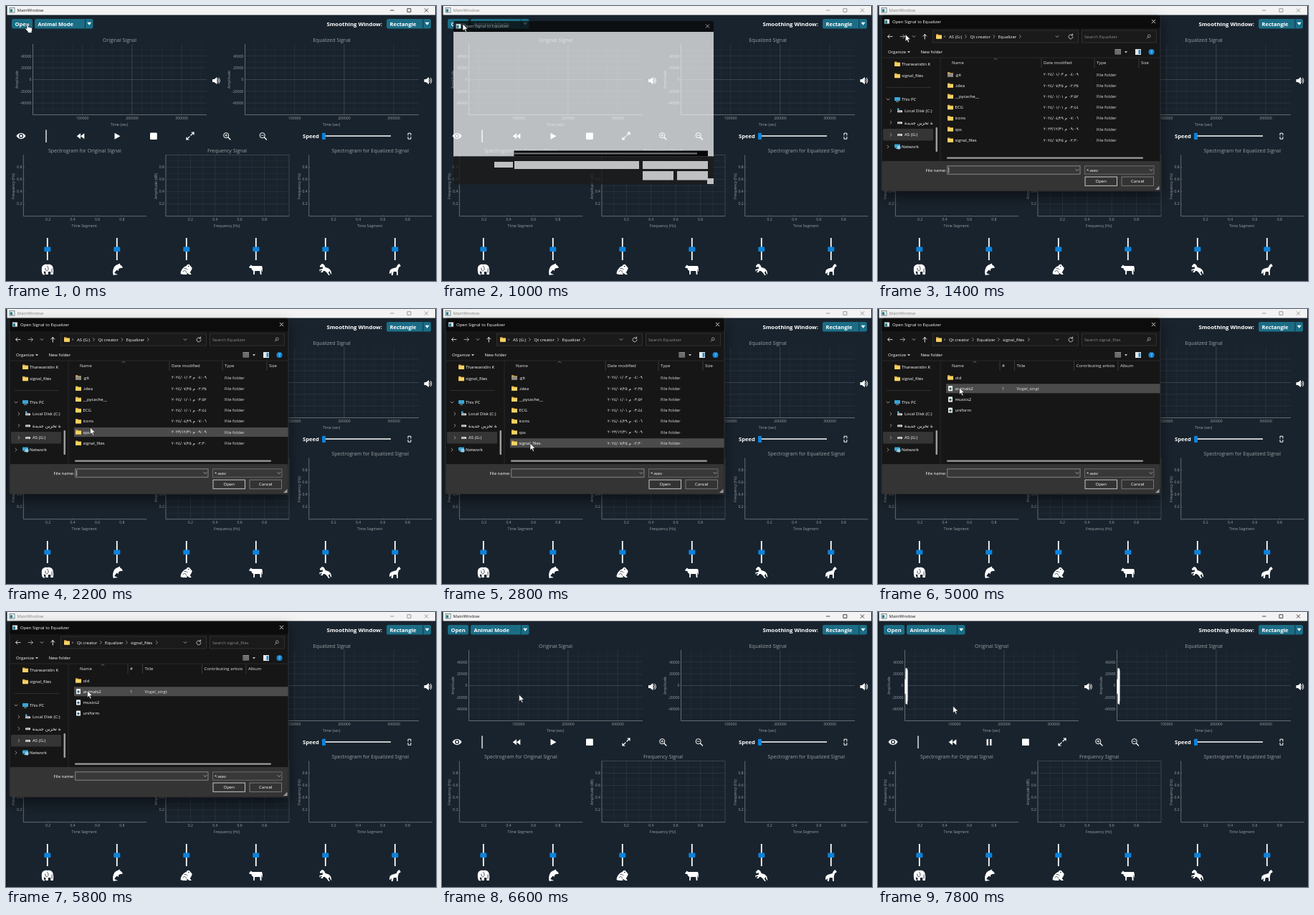
An HTML page for the animation above (8000 ms loop, 600 px wide and 383 px high).

```html
<!DOCTYPE html>
<html lang="en">
<head>
<meta charset="utf-8">
<title>Signal equalizer</title>
<style>
html, body { margin: 0; width: 100%; height: 100%; overflow: hidden; background: #19232d; }
svg { display: block; width: 600px; height: 383px; }
text { font-family: "Open Sans", "Noto Sans", sans-serif; white-space: pre; }
.ar { font-family: "DejaVu Sans", sans-serif; }
</style>
</head>
<body>
<svg id="stage" viewBox="0 0 600 383" xmlns="http://www.w3.org/2000/svg"></svg>
<script>
const LOOP = 8000, STEP = 200;
const BG = '#19232d', BLUE = '#0c83dc', TEAL = '#1b6d86', GREY = '#9a9fa4';

// Text is placed by its vertical middle.
const text = (x, y, s, size = 6, fill = '#fff', more = '') =>
  `<text x="${x}" y="${y + size * 0.36}" font-size="${size}" fill="${fill}" ${more}>${s}</text>`;
const mid = (x, y, s, size, fill = GREY) => text(x, y, s, size, fill, 'text-anchor="middle"');
const bold = (x, y, s, size = 7.6) => text(x, y, s, size, '#fff', 'font-weight="700"');
const rect = (x, y, x2, y2, fill, more = '') =>
  `<rect x="${x}" y="${y}" width="${x2 - x}" height="${y2 - y}" fill="${fill}" ${more}/>`;
const line = (x, y, x2, y2, color, w = 1, more = '') =>
  `<line x1="${x}" y1="${y}" x2="${x2}" y2="${y2}" stroke="${color}" stroke-width="${w}" ${more}/>`;
const fill = (d, color = '#fff') => `<path d="${d}" fill="${color}"/>`;
const stroke = (d, color = '#fff', w = 1) =>
  `<path d="${d}" fill="none" stroke="${color}" stroke-width="${w}" stroke-linecap="round" stroke-linejoin="round"/>`;
const at = (x, y, body) => `<g transform="translate(${x} ${y})">${body}</g>`;
const group = (id, body) => `<g id="${id}">${body}</g>`;
const seq = (from, to, step) =>
  Array.from({ length: Math.floor((to - from) / step + 1.001) }, (_, i) => from + i * step);

const chevRight = (x, y, c = '#bbb') => stroke(`M${x - 1} ${y - 2}l2 2l-2 2`, c, 0.7);
const chevDown = (x, y, c = '#ccc') => stroke(`M${x - 2} ${y - 1}l2 2l2 -2`, c, 0.7);
const cross = (x, y, c) => stroke(`M${x - 2.3} ${y - 2.3}l4.6 4.6m0 -4.6l-4.6 4.6`, c, 0.8);
const appIcon = (x, y) =>
  rect(x, y, x + 7, y + 6.5, '#e9eef0', 'stroke="#46545c" stroke-width=".6"') +
  rect(x + 0.8, y + 1.8, x + 4, y + 5.7, '#21808c');

// ---------- main window ----------
function titleBar() {
  const buttons = stroke('M536.5 6h4.5', 'currentColor', 0.8) +
    stroke('M560.3 3.7h4.6v4.6h-4.6z', 'currentColor', 0.8) + cross(586.5, 6, 'currentColor');
  return rect(1.5, 0, 599, 12.5, '#f3f3f3') + appIcon(5, 2.6) +
    group('caption', text(15.5, 6, 'MainWindow', 6, 'currentColor') + buttons);
}

const combo = (x, x2, label) => rect(x, 18, x2, 31.5, TEAL, 'rx="2.5"') +
  bold(x + 4.5, 24.8, label, 7.5) + line(x2 - 11, 18.5, x2 - 11, 31, BG, 0.8) +
  fill(`M${x2 - 8.3} 22.8h6l-3 4z`);

const upright = (x, y, s) =>
  `<g transform="translate(${x} ${y}) rotate(-90)">${mid(0, 0, s, 5.2)}</g>`;

function signalPlot(x, title) {
  const x2 = x + 242.5, top = 53, base = 151.5, zero = 102.4;
  const px = v => x + v * 0.000692, py = v => zero - v * 0.000818;
  let s = '';
  for (const v of seq(20000, 340000, 20000)) {
    const o = v % 200000 === 0 ? 0.32 : v % 100000 === 0 ? 0.15 : 0.06;
    s += line(px(v), top, px(v), base, '#a0a5aa', 0.8, `opacity="${o}"`);
    if (v % 100000 === 0) s += mid(px(v), 156, v, 5.1);
  }
  for (const v of seq(-50000, 50000, 10000)) {
    const o = v === 0 ? 0.36 : v % 20000 === 0 ? 0.15 : 0.06;
    s += line(x, py(v), x2, py(v), '#a0a5aa', 0.8, `opacity="${o}"`);
    if (v % 20000 === 0) s += text(x - 2, py(v), v, 5.1, GREY, 'text-anchor="end"');
  }
  return s + line(x, top, x, base, '#777d83', 0.8) + line(x, base, x2, base, '#777d83', 0.8) +
    mid(x + 121, 47, title, 7) + mid(x + 120.5, 165, 'Time (sec)', 5.3) + upright(x - 22.5, 102.5, 'Amplitude');
}

function unitPlot(x, title, xName, yName, grid) {
  const top = 207.5, base = 292.7, w = 172;
  let s = '';
  for (const v of seq(1, 10, 1)) {
    const gx = x + w * v / 10, gy = base - (base - top) * v / 10;
    const o = v === 10 ? 0.32 : v % 2 ? 0.08 : 0.15;
    if (grid) s += line(gx, top, gx, base, '#a0a5aa', 0.8, `opacity="${o}"`) +
      line(x, gy, x + w, gy, '#a0a5aa', 0.8, `opacity="${o}"`);
    if (v % 2 || v === 10) continue;
    s += mid(gx, 297, `0.${v}`, 5.1) + text(x - 2, gy, `0.${v}`, 5.1, GREY, 'text-anchor="end"');
    if (!grid) s += line(gx, base, gx, base - 1.5, '#777d83', 0.5) + line(x, gy, x + 1.5, gy, '#777d83', 0.5);
  }
  return s + line(x, top, x, base, '#777d83', 0.8) + line(x, base, x + w, base, '#777d83', 0.8) +
    mid(x + 85.5, 201.5, title, 7) + mid(x + 85, 306, xName, 5.3) + upright(x - 14, 251, yName);
}

const speaker = (x, y) => at(x, y,
  fill('M-5 -2h2.5l4 -3v10l-4 -3h-2.5z') + stroke('M2.8 -2.4q2 2.4 0 4.8M4 -3.8q3 3.8 0 7.6', '#fff', 0.9));

const lens = (x, sign) => at(x, 181,
  `<circle cx="-.8" cy="-.8" r="3.6" fill="none" stroke="#fff"/>` +
  stroke('M2 2l3 3', '#fff', 1.3) + stroke('M-2.4 -.8h3.2' + sign, '#fff', 0.8));

function toolRow() {
  const eye = at(21, 181, fill('M-6.5 0C-3.5 -5.5 3.5 -5.5 6.5 0C3.5 5.5 -3.5 5.5 -6.5 0Z') +
    `<circle r="3" fill="${BG}"/><circle r="1.7" fill="#fff"/>`);
  const expand = at(257, 181, stroke('M1 -1l4 -4M2 -5h3v3M-1 1l-4 4M-2 5h-3v-3', '#fff', 1.2));
  return eye + line(56, 172.5, 56, 190, '#fff', 1.3) +
    at(104, 181.3, fill('M0 -4v8l-5.3 -4zM5.3 -4v8l-5.3 -4z')) +
    group('play', fill('M151.5 176.8L159.5 181.3L151.5 185.8Z')) +
    group('pause', rect(151.5, 177, 154, 185.8, '#fff') + rect(156, 177, 158.5, 185.8, '#fff')) +
    rect(201, 176.6, 210.8, 186, '#fff', 'rx="1"') + expand +
    lens(308, 'M-.8 -2.4v3.2') + lens(358.5, '') +
    bold(414, 181.6, 'Speed') + line(441, 181, 537, 181, '#fff', 1.5) +
    rect(441, 176.8, 446, 186, BLUE, 'rx="1"') +
    stroke('M561 180v-2.8h3.9v2.8M561 182.4v2.8h3.9v-2.8', '#fff', 1);
}

const animals = [
  fill('M-8 -1C-8 -6 -4 -8 0 -7C4 -8 8 -6 8 -1C9 2 8 4 8 7H4.5V3H1V7H-2.5V3C-4 3 -5 2 -5 3C-5 6 -3 6 -4 7.5C-8 8 -8 3 -8 -1Z') +
    stroke('M-.5 -5C2 -3 2 1 -1 2C-3 1 -3 -1 -3 -2M6.3 -1v5', BG, 0.8),
  fill('M-5 8C-7 1 -4 -6 1 -7L4 -8.5L4.5 -6.5C7 -5.5 7 -4 8.5 -2.5C6 -2 4 -2 2.5 -1L2 2L0 .5C-2 2 -3 4 -3.5 5C-2 5.5 0 6 1 7.5C-1 7 -3 7 -5 8Z'),
  fill('M8 -2C7 -4 5 -5 4 -7C2 -8 0 -6 0 -5C-4 -4 -7 0 -8 4C-9 7 -6 7 -2 7H1L0 5C2 5 3 6 4 7H7L5 4C6 2 7 1 8 -2Z') +
    `<circle cx="3" cy="-4.4" r=".8" fill="${BG}"/>` + stroke('M-5 3q3 -4 5 1M-3 -1.5q3 -1 4.5 1.5', BG, 0.7),
  fill('M-9.5 -4L-8 -5L-7.5 -6.5L-5 -5H7.5C9.5 -4.5 9 -1 9.3 3L8.3 2V-1L7.6 1V7H6L5.4 2H-1.5L-2 7H-3.6V2C-6 1 -6 -1 -6.5 -2L-9 -2Z'),
  fill('M-8 -5L-5 -8C-2 -8 -1 -5 0 -3C3 -2 5 -2 6 0C8 1 8 4 8.5 7C7 6 6 4 6 2L4 4L6 8H4.5L1.5 4L-1 2L-3 2L-4 4L-7 4L-4.5 1L-7 1L-8 3L-8.5 0L-4 -1L-4 -4L-7 -3Z'),
  fill('M-6 0C-4 -2 0 -2 2 -3C3 -6 4 -7 6 -8L8 -5L7 -4C5 -4 5 -1 4 1V8H2.5L2 3H-2L-3 8H-5V3C-5 5 -7.5 7 -8 5C-7 3 -8 1 -6 0Z')
];
const gains = animals.map((body, i) => {
  const x = 57.8 + i * 97;
  return line(x, 323, x, 354, '#fff', 1.8) + rect(x - 4.5, 335.5, x + 4.5, 342, BLUE, 'rx="1"') + at(x, 367, body);
}).join('');

const mainWindow = rect(0, 0, 600, 383, BG) + rect(0, 0, 1.2, 383, '#11171d') + titleBar() +
  rect(8, 18, 37, 31.5, TEAL, 'rx="2.5"') + bold(12.5, 24.8, 'Open', 7.5) +
  combo(40, 121.5, 'Animal Mode') + text(525, 24.8, 'Smoothing Window:', 7.8, '#fff', 'font-weight="700" text-anchor="end"') +
  combo(531, 593, 'Rectangle') +
  signalPlot(37.5, 'Original Signal') + signalPlot(333.5, 'Equalized Signal') +
  `<path id="wave" fill="none" stroke="#fff" stroke-width=".8"/>` +
  speaker(293, 104) + speaker(588.5, 104) + toolRow() +
  unitPlot(24.3, 'Spectrogram for Original Signal', 'Time Segment', 'Frequency (Hz)') +
  unitPlot(223, 'Frequency Signal', 'Frequency (Hz)', 'Amplitude (dB)', true) +
  unitPlot(422.7, 'Spectrogram for Equalized Signal', 'Time Segment', 'Frequency (Hz)') + gains;

// ---------- file dialog ----------
const ROW = 15.2, ROW0 = 95.4;
const folder = (x, y, c = '#f8d264') =>
  fill(`M${x} ${y - 3.2}h3l1 1h4v5.2h-8z`, '#dfae40') + rect(x, y - 1.5, x + 8, y + 3.2, c, 'rx=".6"');
const sheet = (x, y) => rect(x, y - 3.6, x + 6, y + 3.6, '#f2f2f2', 'rx=".5"') +
  `<circle cx="${x + 3}" cy="${y + 0.4}" r="1.7" fill="#3c6472"/>`;
const drive = (x, y) => rect(x, y - 1.2, x + 7, y + 1.8, '#d8d8d8', 'rx=".8"') + line(x + 1, y + 0.5, x + 5, y + 0.5, '#555', 0.6);
const arabicDigits = s => s.replace(/\d/g, d => String.fromCharCode(0x660 + +d));

const folders = [
  ['.git', '2024/01/03', '04:09'], ['.idea', '2024/07/25', '02:35'], ['__pycache__', '2024/01/01', '03:52'],
  ['ECG', '2024/01/01', '03:44'], ['icons', '2024/04/29', '07:06'], ['qss', '2023/12/31', '09:09'],
  ['signal_files', '2024/07/25', '02:30']
];

const header = (cells, caret) => cells.map(([x, s], i) =>
  text(x, 79, s, 6, '#e6e6e6') + (i ? line(x - 3, 72.5, x - 3, 86, '#484848', 0.7) : '')).join('') +
  stroke(`M${caret - 2} 74.5l2 -1.6l2 1.6`, '#999', 0.6);

const crumbs = (parts) => parts.map(([x, s, c]) => text(x, 42.5, s) + chevRight(c, 42.5)).join('');

const rootList = header([[103, 'Name'], [231, 'Date modified'], [305, 'Type'], [367, 'Size']], 164) +
  crumbs([[99, 'AS (G:)', 122.5], [128.5, 'Qt creator', 162], [167.5, 'Equalizer', 198.5]]) +
  text(288, 42.5, 'Search Equalizer', 6, '#8d8d8d') +
  folders.map(([name, day, hour], i) => {
    const y = ROW0 + i * ROW;
    return folder(97, y, i ? undefined : '#8d8d8d') + text(107.5, y, name) +
      text(231, y, arabicDigits(`${hour} م ${day}`), 5.6, '#f2f2f2', 'class="ar"') + text(305, y, 'File folder', 6, '#e2e2e2');
  }).join('');

const fileList = header([[103, 'Name'], [173, '#'], [193.5, 'Title'], [276.5, 'Contributing artists'], [338, 'Album']], 135) +
  crumbs([[99, 'Qt creator', 132.5], [138, 'Equalizer', 168.5], [174, 'signal_files', 210.5]]) +
  text(288, 42.5, 'Search signal_files', 6, '#8d8d8d') +
  ['old', 'animals2', 'musics2', 'uniform'].map((name, i) => {
    const y = ROW0 + i * ROW;
    return (i ? sheet(98, y) : folder(97, y)) + text(107.5, y, name);
  }).join('') + text(173, ROW0 + ROW, '1', 6, '#e2e2e2') + text(193.5, ROW0 + ROW, 'Vogel_singt', 6, '#e2e2e2');

const screenIcon = (x, y) => rect(x, y - 3, x + 8, y + 2, '#37a5d8', 'rx=".6"') + rect(x + 2, y + 2.7, x + 6, y + 3.5, '#b8c4ca');

const sidebar = folder(23, 80.7) + text(33, 80.7, 'Tharwanidin K') + folder(23, 97) + text(33, 97, 'signal_files') +
  line(12, 113.5, 74, 113.5, '#3a3a3a', 0.7) +
  chevDown(14, 130) + screenIcon(23, 130) + text(33, 130, 'This PC') +
  chevRight(18, 146) + drive(27, 146.5) + rect(27, 142.5, 29.5, 145, '#3fa9e0') + text(37, 146, 'Local Disk (C:)') +
  chevRight(18, 162.3) + drive(27, 162.5) + text(37, 162.3, 'وحدة تخزين جديدة', 6.4, '#fff', 'class="ar"') +
  rect(7, 171, 77, 187.5, '#353535', 'rx="1.5"') +
  chevRight(18, 179.3) + drive(27, 179.3) + text(37, 179.3, 'AS (G:)') +
  chevRight(14, 196) + screenIcon(23, 195.5) + `<circle cx="29" cy="197" r="2.6" fill="#8fd0ea"/>` + text(33, 196, 'Network');

const navBar = stroke('M20 42.5h-6.5m2.5 -2.5l-2.5 2.5l2.5 2.5', '#ddd', 0.9) +
  stroke('M31 42.5h6.5m-2.5 -2.5l2.5 2.5l-2.5 2.5', '#aaa', 0.9) +
  chevDown(50, 42.5) + stroke('M65.3 46v-6.5m-2.5 2.5l2.5 -2.5l2.5 2.5', '#fff', 0.9) +
  rect(76.5, 34, 279.5, 51, '#1a1a1a', 'stroke="#3b3b3b" stroke-width=".7"') + folder(81, 42.5) +
  text(91.5, 42, '«', 6, '#aaa') + chevDown(250, 42.5) +
  stroke('M271.2 40.7a3 3 0 1 0 .8 2.2m-.5 -4v2h-2', '#ddd', 0.8) +
  rect(284.5, 34, 388.5, 51, '#1a1a1a', 'stroke="#3b3b3b" stroke-width=".7"') +
  `<circle cx="378.3" cy="41.8" r="1.9" fill="none" stroke="#bbb" stroke-width=".7"/>` + stroke('M377 43.3l-2 2', '#bbb', 0.7);

const commandBar = text(14, 64, 'Organize') + fill('M41 63h4l-2 2.4z', '#ccc') + text(59.5, 64, 'New folder') +
  rect(330.5, 60, 339, 67.5, '#8d8d8d') + [62, 64, 66].map(y => line(331, y, 338.5, y, '#222', 0.6)).join('') +
  fill('M344 63h4l-2 2.4z', '#ccc') + rect(359, 60, 367, 68, '#e8e8e8') + rect(363.5, 61, 366.3, 67, '#2a8ccc') +
  `<circle cx="381.5" cy="64" r="4" fill="#1687d3"/>` + mid(381.5, 64, '?', 6, '#fff') +
  line(6, 72, 393.5, 72, '#333', 0.7);

const bottomBar = text(66.5, 228.7, 'File name:') +
  rect(96.8, 222.8, 282, 234.2, '#383838', 'stroke="#999" stroke-width=".8"') + chevDown(278, 228.5) +
  rect(288.5, 222.8, 385, 234.2, '#383838', 'stroke="#777" stroke-width=".8"') + text(291, 228.5, '*.wav') + chevDown(381, 228.5) +
  rect(289, 238, 333.5, 250.3, '#333', 'stroke="#d8d8d8" stroke-width=".9"') + mid(311.2, 244, 'Open', 6, '#fff') +
  rect(340, 238, 384.5, 250.3, '#333', 'stroke="#8a8a8a" stroke-width=".8"') + mid(362.3, 244, 'Cancel', 6, '#fff') +
  fill('M392.5 250.5v5.5h-5.5z', '#999') + line(98.7, 224.5, 98.7, 232.5, '#fff', 0.7, 'id="caret"');

const dialog = group('dialog',
  rect(5, 13, 394, 257.5, '#191919', 'rx="2.5" stroke="#3a3a3a" stroke-width=".6" filter="url(#shadow)"') +
  rect(5.4, 13.4, 393.6, 31, '#0c0c0c', 'rx="2"') + appIcon(9, 18.3) + text(20, 21.5, 'Open Signal to Equalizer') + cross(384.5, 21.5, '#fff') +
  rect(5.4, 216, 393.6, 257, '#343434', 'rx="2"') +
  line(87, 72, 87, 216, '#333', 0.7) + rect(95, 0, 393.6, 13, '#4d4d4d', 'id="hover" stroke-width=".8"') +
  navBar + commandBar + `<g clip-path="url(#side)">${sidebar}</g>` + rect(80.5, 169, 83, 203, '#9c9c9c', 'rx="1"') +
  group('rootList', rootList) + group('fileList', fileList) +
  rect(96, 210.5, 370, 212.7, '#9c9c9c', 'rx="1"') + bottomBar);

// Half-drawn dialog while it opens
const pale = [[73, 217, 99, 225], [101, 216, 275, 227], [280, 216, 371, 227], [280, 230, 323, 242.5], [328, 230, 371, 242.5], [370, 240, 379, 248]];
const ghost = group('ghost',
  rect(16, 21, 379, 36, '#0a0a0a', 'opacity=".78" rx="2"') + appIcon(19.5, 25) + text(30, 28, 'Open Signal to Equalizer', 5.6, '#a0a5a8') + cross(370.5, 28, '#bbb') +
  rect(16, 36, 379, 209.5, '#fff', 'opacity=".71"') + rect(100.5, 201.5, 371, 209.5, '#050709') +
  rect(101, 204.3, 356, 206.5, '#6f7274') + rect(16, 209.5, 379, 248.5, '#1b1b1b', 'opacity=".8" rx="2"') +
  pale.map(r => rect(...r, '#bfc0c1')).join(''));

const cursors =
  group('hand', `<path d="M0 0C0 -1.5 2 -1.5 2 0V4.2L6.5 5.2C8 5.7 7.8 8 7 10V12.3H1.5V10.8L-2 7C-2.5 5.8 -1 5.5 0 6.8Z" fill="#fff" stroke="#111" stroke-width=".6"/>`) +
  group('arrow', `<path d="M0 0V9.6L2.3 7.6L3.9 11.2L5.5 10.5L3.9 7H7Z" fill="#fff" stroke="#111" stroke-width=".6"/>`);

const defs = `<defs><clipPath id="side"><rect x="6" y="73" width="71" height="142"/></clipPath>
  <filter id="shadow" x="-15%" y="-15%" width="130%" height="140%">
    <feDropShadow dx="0" dy="9" stdDeviation="9" flood-color="#000" flood-opacity=".5"/>
  </filter></defs>`;

const stage = document.getElementById('stage');
stage.innerHTML = defs + mainWindow + ghost + dialog + cursors;
const el = id => document.getElementById(id);
const show = (id, on) => el(id).setAttribute('display', on ? 'inline' : 'none');

// ---------- motion ----------
const path = [
  [0, 29, 25], [1200, 29, 25], [2200, 117.5, 165], [2400, 117.5, 165], [2800, 123, 187], [4200, 123, 187],
  [5000, 113.5, 109.5], [6000, 113.5, 109.5], [6400, 107.5, 115], [6800, 107.5, 115], [7400, 104.7, 131], [8000, 104.7, 131]
];
function pointer(t) {
  const i = path.findIndex(k => k[0] > t);
  const [t0, x0, y0] = path[i - 1], [t1, x1, y1] = path[i];
  const u = (t - t0) / (t1 - t0), e = u * u * (3 - 2 * u);
  return [x0 + (x1 - x0) * e, y0 + (y1 - y0) * e];
}

// The sound opens softly, then fills the range.
function wave(x, width) {
  let d = '';
  for (let i = 0; i * 0.14 <= width; i++) {
    const dx = i * 0.14, amp = dx < 1.1 ? 10 : 23 + 2.5 * Math.sin(i * 1.7);
    d += `${i ? 'L' : 'M'}${x + 0.4 + dx} ${103.8 + (i % 2 ? amp : -amp)}`;
  }
  return d;
}

function draw(t) {
  const open = t >= 1200 && t < 6200, inFiles = t >= 4400, playing = t >= 7000;
  const [x, y] = pointer(t);
  el('caption').setAttribute('color', t >= 800 && t < 6200 ? '#858585' : '#1a1a1a');
  show('ghost', t >= 1000 && t < 1200);
  show('dialog', open);
  el('dialog').setAttribute('opacity', t >= 6000 ? 0.5 : 1);
  show('rootList', !inFiles);
  show('fileList', inFiles);
  show('caret', t < 3200 && t % 1000 < 500);

  const row = Math.floor((y - 88) / ROW), picked = t >= 3200 && !inFiles;
  show('hover', x > 95 && row >= 0 && row < (inFiles ? 4 : 7));
  el('hover').setAttribute('y', ROW0 + row * ROW - 6.4);
  el('hover').setAttribute('fill', picked ? '#777' : '#4b4b4b');
  el('hover').setAttribute('stroke', picked ? '#a6a6a6' : 'none');

  show('play', !playing);
  show('pause', playing);
  const width = playing ? 0.8 + (t - 7000) / 800 * 2.4 : 0;
  el('wave').setAttribute('d', playing ? wave(37.5, width) + wave(333.5, width) : '');

  show('hand', t < 800);
  show('arrow', t >= 800);
  for (const id of ['hand', 'arrow']) el(id).setAttribute('transform', `translate(${x} ${y})`);
}

function tick() {
  draw(Math.floor(performance.now() % LOOP / STEP) * STEP);
  requestAnimationFrame(tick);
}
tick();
</script>
</body>
</html>
```
